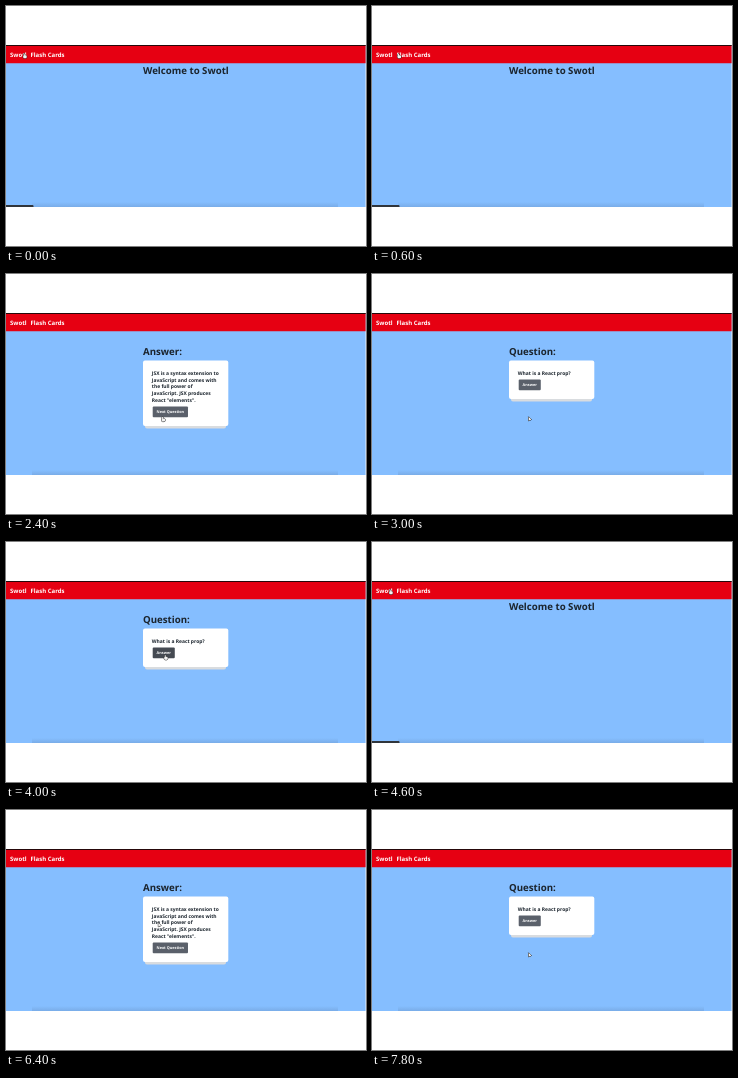
An HTML page with a canvas for the animation above (8 s loop, 360x240 px).

```html
<!DOCTYPE html>
<html lang="en">
<head>
<meta charset="utf-8">
<title>Flash Cards</title>
<style>
  html, body { margin: 0; width: 100%; height: 100%; overflow: hidden; background: #fff; }
  canvas { display: block; width: 100vw; height: 100vh; }
</style>
</head>
<body>
<canvas></canvas>
<script>
const W = 360, H = 240, LOOP = 8000, CYCLE = 4600, STEP = 200, TRAVEL = 600;
const LEFT = 137, LINE = 6.75, INK = '#1b242d';
const canvas = document.querySelector('canvas');
const ctx = canvas.getContext('2d');

// Where the pointer rests, and when it gets there
const stops = [
  { at: 0, x: 18.2, y: 47.5 },
  { at: 800, x: 37, y: 47.5 },
  { at: 1400, x: 151.8, y: 109 },
  { at: 2200, x: 156.6, y: 142.8 },
  { at: 3800, x: 159.2, y: 113 }
];

const views = [
  { from: 0, title: 'Welcome to Swotl' },
  { from: 800, title: 'Question:', lines: ['What is JSX?'], button: 'Answer' },
  { from: 1600, title: 'Answer:', button: 'Next Question', lines: [
    'JSX is a syntax extension to', 'JavaScript and comes with', 'the full power of',
    'JavaScript. JSX produces', 'React "elements".'] },
  { from: 2800, title: 'Question:', lines: ['What is a React prop?'], button: 'Answer' }
];

function text(str, x, y, size, color) {
  ctx.font = `bold ${size}px "Noto Sans", sans-serif`;
  ctx.fillStyle = color;
  ctx.fillText(str, x, y);
  return ctx.measureText(str).width;
}

function box(x, y, w, h, color, r = 0) {
  ctx.fillStyle = color;
  ctx.beginPath();
  ctx.roundRect(x, y, w, h, r);
  ctx.fill();
}

function pointerAt(t) {
  let { x, y } = stops[0];
  for (const stop of stops) {
    const p = Math.min(1, Math.max(0, (t - stop.at) / TRAVEL + 1));
    if (stop.at === 0) continue;
    x += (stop.x - x) * p * p;
    y += (stop.y - y) * p * p;
  }
  return { x, y };
}

function drawPointer({ x, y }, hand) {
  ctx.beginPath();
  if (hand) {
    ctx.roundRect(x - 0.5, y, 1, 3, 0.5);
    ctx.roundRect(x - 1, y + 1.8, 3.5, 3, 1);
  } else {
    ctx.moveTo(x, y);
    ctx.lineTo(x, y + 4);
    ctx.lineTo(x + 2.8, y + 2.8);
    ctx.closePath();
  }
  ctx.lineWidth = 1;
  ctx.strokeStyle = '#222';
  ctx.stroke();
  ctx.fillStyle = '#f2f2f2';
  ctx.fill();
}

// Returns whether the pointer is on the button
function drawCard({ lines, button }, pointer) {
  const extra = (lines.length - 1) * LINE;
  const x = LEFT + 9.7, y = 105.4 + extra;
  box(LEFT + 2, 90, 81, 37.5 + extra, '#d9dcdf', 2);
  box(LEFT, 86.5, 85.3, 38.5 + extra, '#fff', 2);
  lines.forEach((line, i) => text(line, LEFT + 8.8, 100.8 + i * LINE, 4.95, INK));

  ctx.font = 'bold 3.82px "Noto Sans", sans-serif';
  const w = ctx.measureText(button).width + 7.8;
  const inside = h => pointer.x > x && pointer.x < x + w && pointer.y > y && pointer.y < y + h;
  box(x, y, w, 10.8, inside(10) ? '#454a52' : '#5a606a', 1);
  text(button, x + 3.9, y + 6.8, 3.82, '#fff');
  return inside(11);
}

function drawPage() {
  box(0, 0, W, H, '#fff');
  box(0, 39, W - 0.4, 162, '#85beff');
  const shade = ctx.createLinearGradient(0, 196, 0, 201);
  shade.addColorStop(0, 'rgba(60, 80, 110, 0)');
  shade.addColorStop(1, 'rgba(60, 80, 110, 0.16)');
  box(26, 196, 306, 5, shade);
  box(0, 39, W - 0.4, 18.3, '#e60012');
  box(0, 39, W - 0.4, 1, '#26080a');
  text('Swotl', 4, 50.8, 6, '#fff');
  text('Flash Cards', 24.5, 50.8, 6, '#fff');
}

function draw(t) {
  const view = views.findLast(v => t >= v.from);
  const pointer = pointerAt(t);
  let hand = pointer.y < 57;
  drawPage();
  text(view.title, LEFT, view.lines ? 81.3 : 68.2, 9.67, INK);
  if (view.lines) hand = drawCard(view, pointer) || hand;
  if (t < 1400) box(0, 199, 27.5, 2, '#30353b', [0, 1, 0, 0]);
  drawPointer(pointer, hand);
}

function frame(now) {
  const dpr = window.devicePixelRatio || 1;
  const w = Math.round(innerWidth * dpr), h = Math.round(innerHeight * dpr);
  if (canvas.width !== w || canvas.height !== h) {
    canvas.width = w;
    canvas.height = h;
  }
  ctx.setTransform(w / W, 0, 0, h / H, 0, 0);
  ctx.textRendering = 'geometricPrecision';
  const t = Math.floor((now % LOOP) / STEP) * STEP;
  draw(t % CYCLE);
  requestAnimationFrame(frame);
}

frame(performance.now());
</script>
</body>
</html>
```
